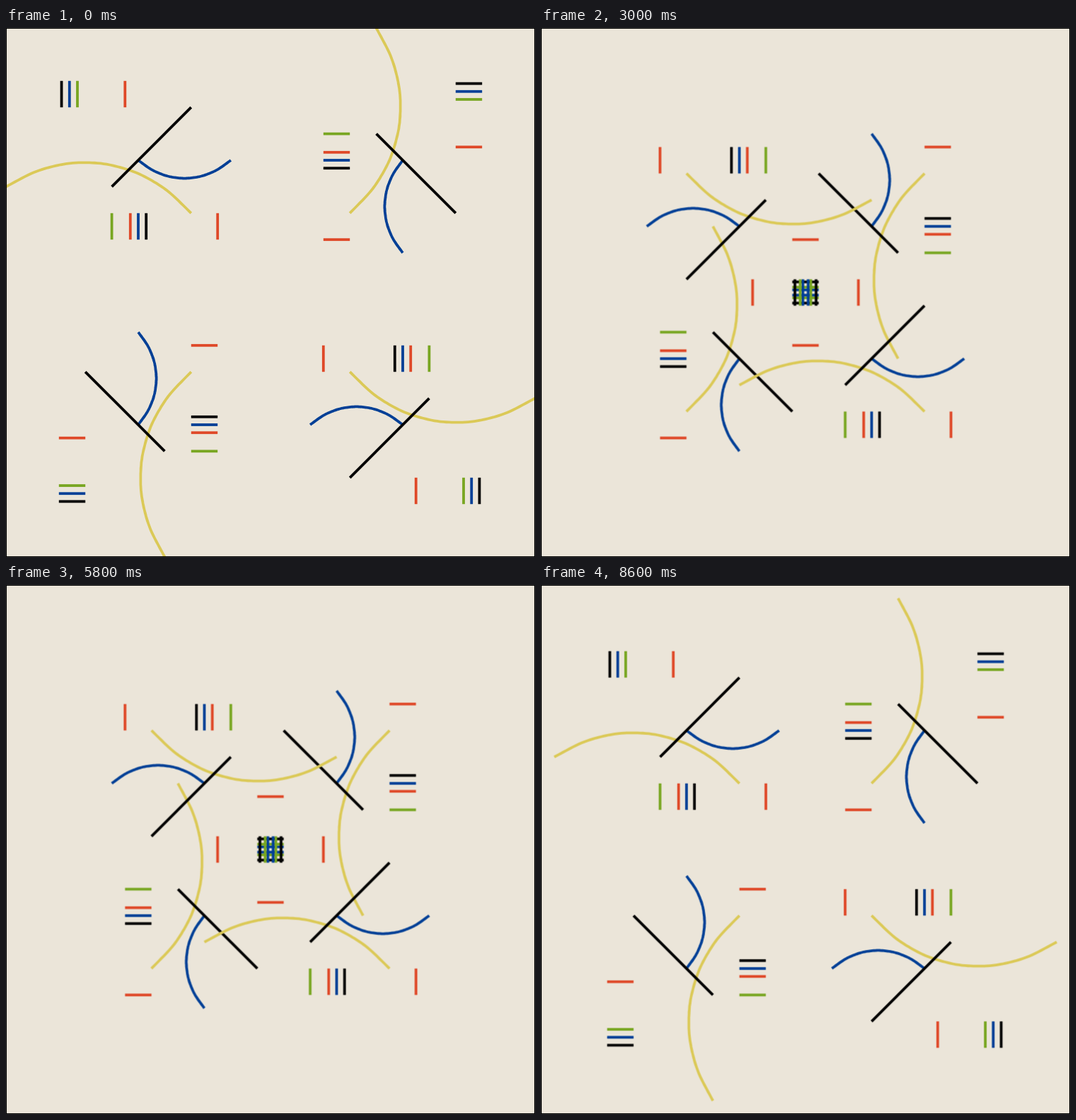
An HTML page for the animation above (8.8 s loop, 748 by 748 pixels).

```html
<!DOCTYPE html>
<html lang="en">
<head>
<meta charset="utf-8">
<title>Four quarters</title>
<style>
  html, body { margin: 0; width: 100%; height: 100%; overflow: hidden; background: #ebe5d9; }
  svg { display: block; width: 100vw; height: 100vh; }
  .move { animation: slide 8800ms -2ms infinite; }
  /* one unit of 18.7px per step, in along the diagonal and back again */
  @keyframes slide {
    0%   { transform: translate(0, 0); animation-timing-function: steps(22, end); }
    50%  { transform: translate(411.4px, 411.4px); animation-timing-function: steps(22, end); }
    100% { transform: translate(0, 0); }
  }
</style>
</head>
<body>
<svg id="stage" viewBox="0 0 748 748" fill="none" stroke-width="3.8"></svg>
<script>
const UNIT = 18.7;
const BLACK = '#000', BLUE = '#003f96', GREEN = '#78a621', RED = '#df4828', YELLOW = '#dbc957';
const stage = document.getElementById('stage');

function add(parent, tag, attrs) {
  const el = document.createElementNS('http://www.w3.org/2000/svg', tag);
  for (const key in attrs) el.setAttribute(key, attrs[key]);
  return parent.appendChild(el);
}

function polyline(parent, points, stroke) {
  const d = 'M' + points.map(p => p.map(v => (v * UNIT).toFixed(2)).join(' ')).join('L');
  add(parent, 'path', { d, stroke, 'stroke-linejoin': 'round' });
}

// X-spline blending function
function blend(num, den) {
  const u = num / den, p = 2 * den * den;
  return u ** 3 * (10 - p + (2 * p - 15) * u + (6 - p) * u * u);
}

// Open X-spline, shape 0 at the ends and 0.5 inside
function spline(pts, steps = 12) {
  const last = pts.length - 1, out = [];
  const at = i => pts[Math.max(0, Math.min(last, i))];
  const shape = i => (i === 0 || i === last ? 0 : 0.5);
  for (let i = 0; i < last; i++) {
    const a = shape(i), b = shape(i + 1);
    for (let k = 0; k < steps; k++) {
      const t = k / steps;
      const w = [
        t < a ? blend(a - t, 1 + a) : 0,
        blend(1 + b - t, 1 + b),
        blend(t + a, 1 + a),
        t > 1 - b ? blend(t + b - 1, 1 + b) : 0
      ];
      const sum = w[0] + w[1] + w[2] + w[3];
      out.push([0, 1].map(c => w.reduce((s, v, j) => s + v * at(i + j - 1)[c], 0) / sum));
    }
  }
  out.push(pts[last]);
  return out;
}

// Control points on a circular arc; bend = rise / half chord
function arc(x1, y1, x2, y2, bend, parts = 6) {
  const sweep = 4 * Math.atan(bend);
  const dist = (1 - bend * bend) / (4 * bend);
  const cx = (x1 + x2) / 2 - (y2 - y1) * dist;
  const cy = (y1 + y2) / 2 + (x2 - x1) * dist;
  const pts = [];
  for (let i = 0; i <= parts; i++) {
    const q = sweep * i / parts, c = Math.cos(q), s = Math.sin(q);
    pts.push([cx + (x1 - cx) * c - (y1 - cy) * s, cy + (x1 - cx) * s + (y1 - cy) * c]);
  }
  return spline(pts);
}

function quarter(angle) {
  const turn = add(stage, 'g', { transform: `rotate(${angle} 374 374)` });
  const g = add(turn, 'g', { class: 'move' });
  const bar = (x, y, color) => polyline(g, [[x, y], [x, y + 2]], color);

  polyline(g, arc(0, 12, 14, 14, 0.4), YELLOW);
  polyline(g, arc(10, 10, 17, 10, -0.4), BLUE);
  polyline(g, [[8, 12], [14, 6]], BLACK);

  bar(4.2, 4, BLACK);
  bar(4.8, 4, BLUE);
  bar(5.4, 4, GREEN);
  bar(9, 4, RED);

  bar(8, 14, GREEN);
  bar(9.4, 14, RED);
  bar(10, 14, BLUE);
  bar(10.6, 14, BLACK);
  bar(16, 14, RED);
}

[90, 270, 0, 180].forEach(quarter);
add(stage, 'rect', { x: 0.5, y: 0.5, width: 747, height: 747, stroke: BLACK, 'stroke-width': 1 });
</script>
</body>
</html>
```
